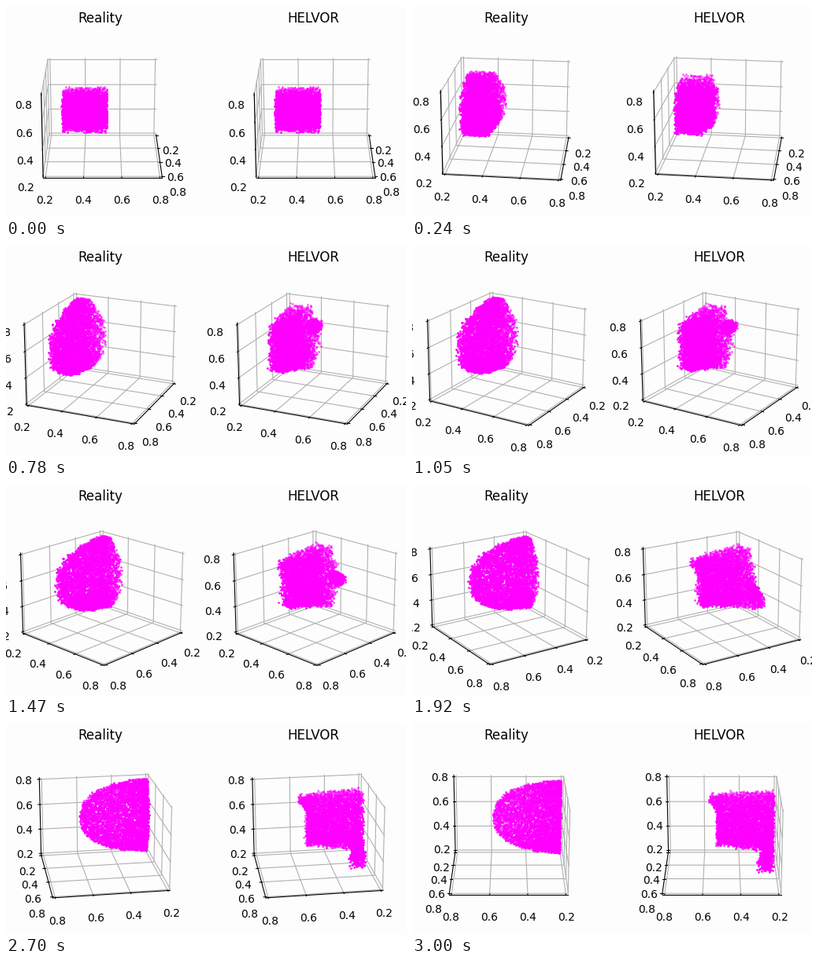
Recreate the animation shown at these times as a matplotlib script. Size 508 by 269 pixels, loop 3.03 s.

```python
import matplotlib.pyplot as plt
import numpy as np
from matplotlib.animation import FuncAnimation
from matplotlib.ticker import MultipleLocator

W, H, DPI = 508, 269, 100
FRAMES, INTERVAL = 101, 30
POINTS, JET, BANDS = 5000, 480, 6
SIDE = 496 / 2.2
BOTTOM = 126.6 - SIDE / 2
PAPER = "#fdfdfd"

plt.rcParams["axes3d.automargin"] = True

rng = np.random.default_rng(4)
a, b, c = rng.random((3, POINTS))
s = 2 * c - 1
rough = rng.normal(0, 0.003, (3, POINTS))
cube = np.array([0.4, 0.4, 0.5])[:, None] + 0.248 * (np.array([a, b, c]) - 0.5)

# Jet particles: position along the stream and offset from its axis
along = rng.random(JET) ** 0.45
ball = rng.normal(size=(3, JET))
ball *= 0.053 * rng.random(JET) ** (1 / 3) / np.linalg.norm(ball, axis=0)
ball *= 0.65 + 0.35 * along ** 2


def ease(t, length):
    p = min(t / length, 1)
    return p * p * (3 - 2 * p)


def splash(t):
    """Block flattened into a domed disc in the corner."""
    depth = np.interp(t, [0.16, 0.35, 0.5, 0.8, 1], [0.205, 0.18, 0.168, 0.145, 0.135])
    u = a ** 1.35 * (1 - np.abs(s) ** 2.3) ** (1 / 2.3)
    thick = depth * (1 - 0.55 * np.abs(s) ** 2.5) * (1 - 0.65 * u)
    return np.array([0.206 + 0.385 * u, 0.206 + b * thick, 0.498 + 0.283 * s])


def slump(t):
    """Block that keeps its bulk, grows an ear and sheds a falling jet."""
    reach = np.interp(t, [0.16, 0.6, 0.8, 1], [0.295, 0.285, 0.3, 0.322])
    ear = np.interp(t, [0.3, 0.65, 1], [0, 0.18, 0.15])
    inner = np.interp(t, [0.16, 0.5, 1], [0.26, 0.245, 0.225])
    outer = np.interp(t, [0.16, 1], [0.17, 0.195])
    bulge = 1 + ear * np.exp(-((s - 0.85) / 0.25) ** 2)
    thick = 0.205 * (1 - 0.35 * a) * (1 - 0.28 * s ** 2)
    pos = np.array([
        0.208 + reach * a * bulge,
        0.208 + b * thick,
        0.487 + s * (inner + (outer - inner) * a),
    ]) + rough
    keys = [0.16, 0.35, 0.49, 0.64, 0.79, 1]
    tip = np.array([
        0.255,
        np.interp(t, keys, [0.37, 0.405, 0.44, 0.485, 0.465, 0.445]),
        np.interp(t, keys, [0.62, 0.61, 0.505, 0.35, 0.235, 0.192]),
    ])
    root = np.array([0.24, 0.365, 0.54])
    pos[:, :JET] = root[:, None] + (tip - root)[:, None] * along + ball
    pos[:2] = np.maximum(pos[:2], 0.205)
    return pos


def make_axes(left, title):
    ax = fig.add_axes([left / W, BOTTOM / H, SIDE / W, SIDE / H],
                      projection="3d", facecolor=PAPER)
    # 3D axes lower their titles to 0.92 of the given height
    ax.set_title(title, y=1 / 0.92)
    layers = [
        ax.plot([0.5], [0.5], [0.5], "o", color="magenta", ms=2, mew=0, alpha=alpha)[0]
        for alpha in np.linspace(0.6, 1, BANDS)
    ]
    ax.set(xlim=(0.2, 0.8), ylim=(0.2, 0.8), zlim=(0.2, 0.8))
    for axis in (ax.xaxis, ax.yaxis, ax.zaxis):
        axis.set_major_locator(MultipleLocator(0.2))
        axis.set_pane_color(PAPER)
    return ax, layers


fig = plt.figure(figsize=(W / DPI, H / DPI), dpi=DPI, facecolor=PAPER)
views = [
    (*make_axes(7, "Reality"), splash),
    (*make_axes(7 + 1.2 * SIDE, "HELVOR"), slump),
]


def update(i):
    t = i / (FRAMES - 1)
    # Stay a hair off the square views, where the choice of edges is a tie
    azim = np.clip(90 * t, 1e-5, 90 - 1e-5)
    rad = np.radians(azim)
    mix = ease(t, 0.14)
    for ax, layers, shape in views:
        ax.view_init(elev=20, azim=azim)
        pos = cube + (shape(t) - cube) * mix
        # Far to near, so that distant dots are fainter
        order = np.argsort(pos[0] * np.cos(rad) + pos[1] * np.sin(rad))
        for layer, part in zip(layers, np.array_split(order, BANDS)):
            layer.set_data_3d(*pos[:, part])
    return []


anim = FuncAnimation(fig, update, frames=FRAMES, interval=INTERVAL,
                     repeat=True, repeat_delay=0, blit=False)
plt.show()
```
